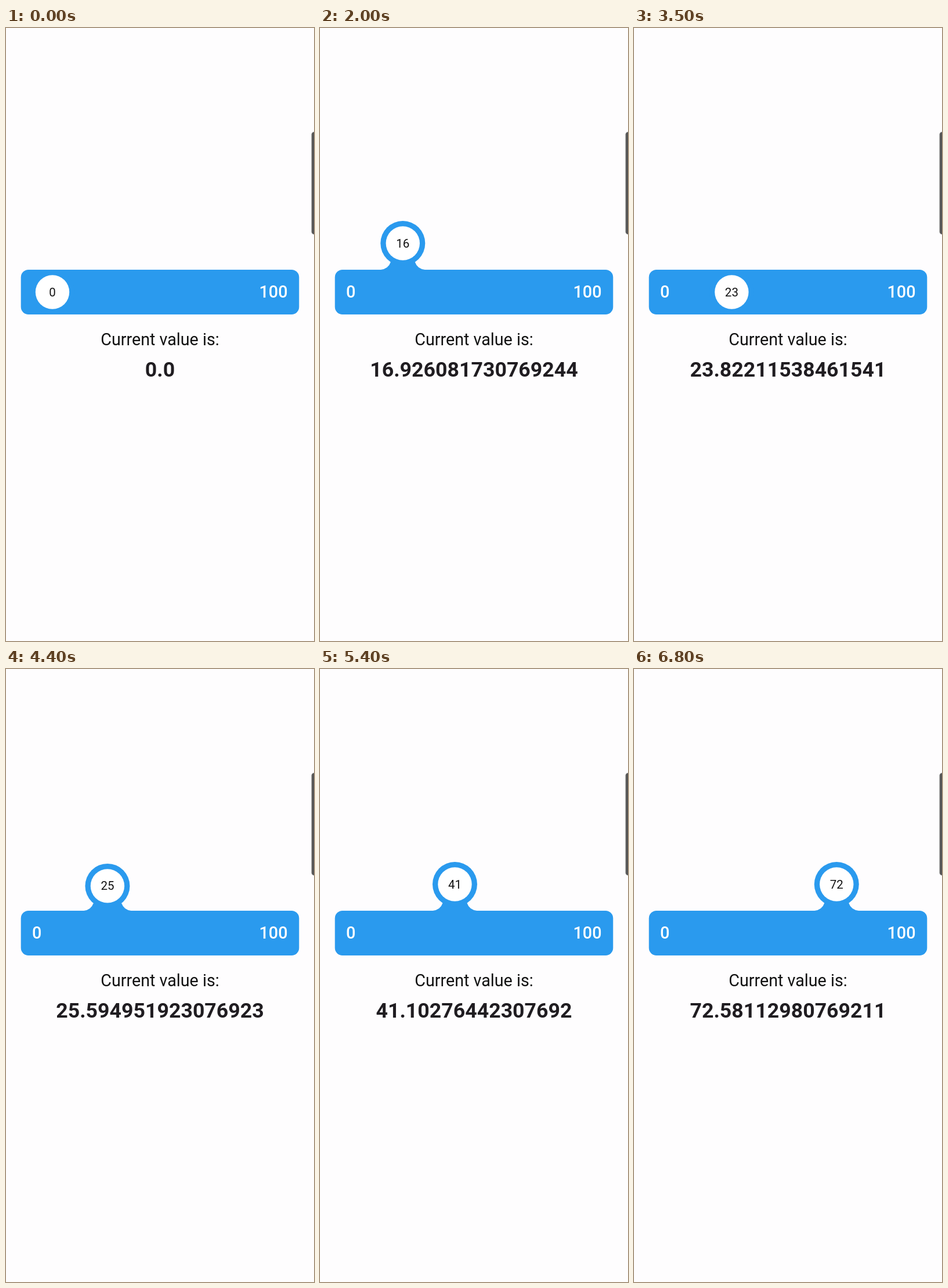
Recreate the animation shown at these times as an HTML page with a canvas. Size 531 by 1055 pixels, loop 6.9 s.

```html
<!DOCTYPE html>
<html lang="en">
<head>
<meta charset="utf-8">
<title>Fluid slider</title>
<style>
html, body { margin: 0; width: 100%; height: 100%; overflow: hidden; background: #fefdfe; }
canvas { display: block; }
</style>
</head>
<body>
<canvas id="stage" width="531" height="1055"></canvas>
<script>
const ctx = document.getElementById('stage').getContext('2d');
const LOOP = 6900, STEP = 100;
const BLUE = '#2a9aee', PAPER = '#fefdfe';
const track = { x: 25.7, y: 416, w: 479.6, h: 77, r: 13 };
const thumb = { r: 38.5, inner: 29.2, restY: 454.5, lift: 84 };

// [time in ms, slider value]
const drag = [
  [1500, 0], [2000, 16.926081730769244], [2400, 21], [3100, 23.82211538461541],
  [4300, 23.82211538461541], [4800, 32.6923076923077], [5400, 41.10276442307692],
  [6200, 53.840144230769226], [6800, 72.58112980769211]
];
// [time in ms, 1 = press, 0 = release]
const touches = [[1430, 1], [3100, 0], [4130, 1]];
const PRESS_TIME = 400;

function valueAt(t) {
  if (t <= drag[0][0]) return drag[0][1];
  for (let i = 1; i < drag.length; i++) {
    const [t0, a] = drag[i - 1], [t1, b] = drag[i];
    if (t === t1 || a === b && t < t1) return b;
    if (t < t1) {
      const v = a + (b - a) * (t - t0) / (t1 - t0);
      return Math.round(v * 332.8) * 100 / 33280;
    }
  }
  return drag[drag.length - 1][1];
}

function riseAt(t) {
  let rise = 0;
  for (const [start, pressed] of touches) {
    if (t < start) break;
    const k = Math.min(1, (t - start) / PRESS_TIME);
    rise = pressed ? 1 - (1 - k) ** 3 : 1 - k * k * (3 - 2 * k);
  }
  return rise;
}

function label(text, x, y, size, weight, color, align = 'center') {
  ctx.font = `${weight} ${size}px Roboto, sans-serif`;
  ctx.fillStyle = color;
  ctx.textAlign = align;
  ctx.fillText(text, x, y);
}

function disc(x, y, r, color) {
  ctx.fillStyle = color;
  ctx.beginPath();
  ctx.arc(x, y, r, 0, Math.PI * 2);
  ctx.fill();
}

function box(x, y, w, h, r, color) {
  ctx.fillStyle = color;
  ctx.beginPath();
  ctx.roundRect(x, y, w, h, r);
  ctx.fill();
}

// Concave bridge between the track and the lifted thumb
function neck(x, y, rise) {
  const top = track.y - 13.2 * rise;
  const dy = top - y;
  if (rise < 0.02 || Math.abs(dy) >= thumb.r) return;
  const half = Math.sqrt(thumb.r ** 2 - dy * dy);
  const foot = half + 17 * rise;
  ctx.fillStyle = BLUE;
  ctx.beginPath();
  ctx.moveTo(x - foot, track.y + 1);
  ctx.lineTo(x - foot, track.y);
  ctx.quadraticCurveTo(x - half - 4, track.y - 1.5, x - half, top);
  ctx.lineTo(x + half, top);
  ctx.quadraticCurveTo(x + half + 4, track.y - 1.5, x + foot, track.y);
  ctx.lineTo(x + foot, track.y + 1);
  ctx.fill();
}

function draw(t) {
  const value = valueAt(t), rise = riseAt(t);
  const x = 80 + 3.71 * value;
  const y = thumb.restY - thumb.lift * rise;

  ctx.fillStyle = PAPER;
  ctx.fillRect(0, 0, 531, 1055);
  box(526.5, 178.5, 12, 177, 5, '#8a8a8a');
  box(527.5, 179.5, 12, 175, 4, '#545454');

  box(track.x, track.y, track.w, track.h, track.r, BLUE);
  label('0', 45, 463.5, 28.8, 500, '#fff', 'left');
  label('100', 485.5, 463.5, 28.8, 500, '#fff', 'right');

  neck(x, y, rise);
  disc(x, y, thumb.r, BLUE);
  disc(x, y, thumb.inner, '#fff');
  label(String(Math.floor(value)), x, y + 7, 20.5, 400, '#111');

  label('Current value is:', 265.5, 545.5, 28.7, 400, '#111');
  const text = Number.isInteger(value) ? value.toFixed(1) : String(value);
  label(text, 265.5, 599.5, 35.7, 700, '#201d21');
}

let start;
function tick(now) {
  if (start === undefined) start = now;
  const t = (now - start) % LOOP;
  draw(Math.floor(t / STEP) * STEP);
  requestAnimationFrame(tick);
}
draw(0);
requestAnimationFrame(tick);
</script>
</body>
</html>
```
